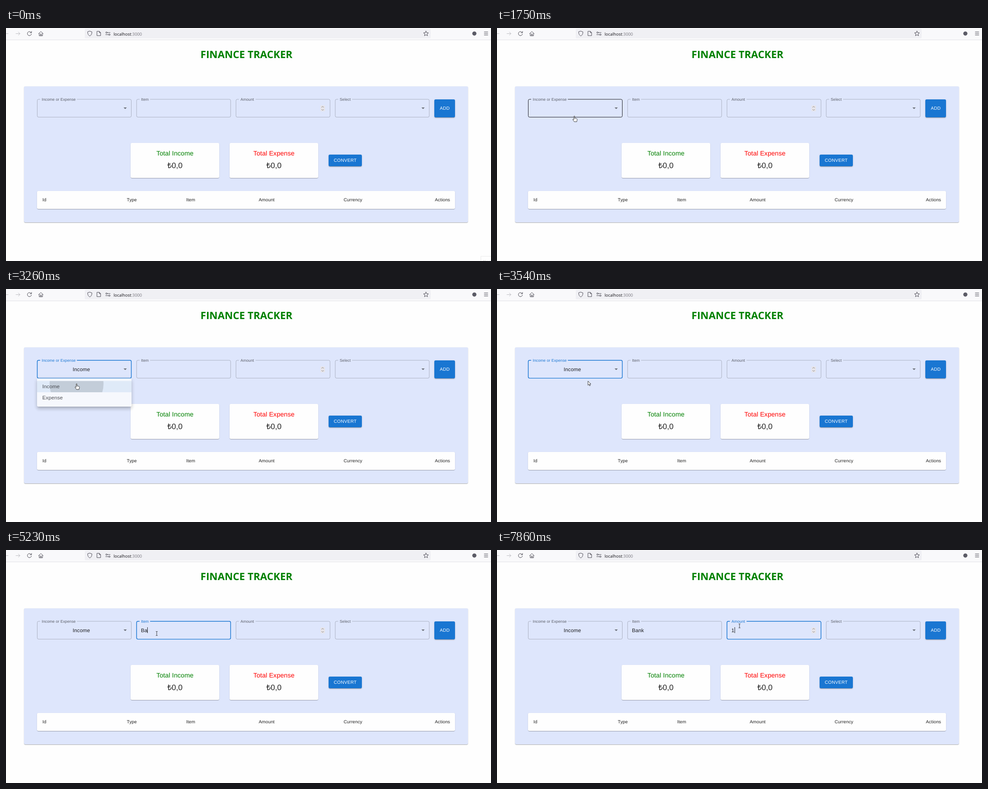
Write an HTML page that moves like this. It is 1078x519 px and loops after 8 s.

```html
<!DOCTYPE html>
<html lang="en">
<head>
<meta charset="utf-8">
<title>Finance Tracker</title>
<style>
  html, body { margin: 0; width: 100%; height: 100%; overflow: hidden; background: #fefefe; }
  body { position: relative; font-family: "Liberation Sans", Arial, sans-serif; }
  svg, .box, #menu { position: absolute; }
  svg { left: 0; top: 0; width: 1078px; height: 519px; }
  text { text-rendering: geometricPrecision; }
  .box { border-radius: 3px; background: #fefefe;
    box-shadow: 0 1.4px .7px -.7px #0003, 0 .7px .7px #00000024, 0 .7px 2.2px #0000001f; }
  .panel { background: #dee6fc; }
  .button { background: #1976d2;
    box-shadow: 0 2.2px .7px -1.4px #0003, 0 1.4px 1.4px #00000024, 0 .7px 3.6px #0000001f; }
  #menu { left: 69.3px; top: 198.9px; width: 209.4px; height: 51.7px; padding: 5.7px 0;
    border-radius: 3px; background: #fefefe; transform-origin: 50% 0;
    box-shadow: 0 3.6px 3.6px -2.2px #0003, 0 5.7px 7.2px .7px #00000024, 0 2.2px 10px 1.4px #0000001f; }
  .row { position: relative; overflow: hidden; height: 25.85px; padding-left: 11.5px;
    font-size: 11.5px; line-height: 25.85px; letter-spacing: .00938em; color: #000000de; }
  #ripple { position: absolute; left: 87.5px; top: 7px; border-radius: 50%;
    transform: translate(-50%, -50%); background: #00000029; }
  .input { font-size: 11.5px; letter-spacing: .00938em; }
  .label { font-size: 8.6px; letter-spacing: .00938em; }
  .cell { font-size: 10.05px; letter-spacing: .01071em; }
  .action { font-size: 10.05px; letter-spacing: .02857em; fill: #fff; text-anchor: middle; }
  .total { font-size: 14.36px; letter-spacing: .0075em; text-anchor: middle; }
  .sum { font-size: 17.23px; text-anchor: middle; }
  .url { font-family: "Open Sans", "Noto Sans", sans-serif; font-size: 9.4px; }
  .title { font-family: "Open Sans", "Noto Sans", sans-serif; font-size: 22.5px; font-weight: 700; }
  .icons { fill: none; stroke: #4b4a54; stroke-width: 1; stroke-linecap: round; stroke-linejoin: round; }
</style>
</head>
<body>
<div id="boxes"></div>
<svg id="page" viewBox="0 0 1078 519" fill="#000000de">
  <rect width="1078" height="26" fill="#f9f9fb"/>
  <rect y="26" width="1078" height="1" fill="#e1e1e6"/>
  <rect x="175" y="1.5" width="769" height="21.5" rx="3" fill="#f0f0f4"/>
  <g class="icons">
    <path d="M0 12.5H5M22 12.5H31M27.5 9L31 12.5L27.5 16" stroke="#bdbdc2"/>
    <path d="M56 10A4.6 4.6 0 1 0 56.6 13.5M56.8 7.5V10.7H53.6"/>
    <path d="M72.5 12.5L77.5 7.8L82.5 12.5M73.8 11.5V17.3H81.2V11.5M76.3 17V13.5H78.7V17"/>
    <path d="M186.3 7L191 8.7C191 13.5 189.5 16 186.3 17.7C183 16 181.5 13.5 181.5 8.7Z"/>
    <path d="M202.5 7.3H207.5L210.3 10.2V17H202.5ZM207.3 7.5V10.4H210"/>
    <path d="M225.5 10.2H231.5M221.5 14.8H227.5"/>
    <circle cx="223.3" cy="10.2" r="1.6"/><circle cx="229.7" cy="14.8" r="1.6"/>
    <path id="star"/>
    <path d="M1063 8.8H1071M1063 12.2H1071M1063 15.6H1071"/>
  </g>
  <circle cx="1041" cy="12.3" r="4.6" fill="#5b5b66"/>
  <text class="url" x="239" y="16.5" fill="#15141a">localhost<tspan fill="#77767e">:3000</tspan></text>
  <text class="title" x="534.5" y="67" text-anchor="middle" fill="#008000">FINANCE TRACKER</text>
  <g id="fields"></g>
  <path d="M731 0" />
  <path id="arrow" fill="#0000008a" d="M261.3 177H268.5L264.9 180.6Z"/>
  <path fill="#0000008a" d="M923.4 177H930.6L927 180.6Z"/>
  <rect x="699" y="172.5" width="10" height="13" rx="1" fill="#e7e5ea"/>
  <path d="M701.3 177L703.8 174.5L706.3 177M701.3 181L703.8 183.5L706.3 181" fill="none" stroke="#85817f"/>
  <text class="input" id="type" x="167.5" y="182.6" text-anchor="middle"></text>
  <text class="input" id="item" x="300" y="182.6"></text>
  <text class="input" id="amount" x="521" y="182.6"></text>
  <rect id="caret" y="172" width="1" height="13"/>
  <text class="action" x="975.3" y="182.2">ADD</text>
  <text class="action" x="754" y="298.4">CONVERT</text>
  <text class="total" x="375.5" y="283.6" fill="#008000">Total Income</text>
  <text class="total" x="595.5" y="283.6" fill="#f00">Total Expense</text>
  <text class="sum" x="375.4" y="311.8">₺0,0</text>
  <text class="sum" x="595.4" y="311.8">₺0,0</text>
  <g id="cells"></g>
  <g id="hint"><rect x="1055.5" y="508.5" width="30" height="20" fill="#fefefe" stroke="#ebebeb"/>
    <text id="hintText" x="1060" y="523.5" font-size="10" fill="#c8c8c8">Kapat</text></g>
</svg>
<div id="menu">
  <div class="row" id="choice">Income<div id="ripple"></div></div>
  <div class="row">Expense</div>
</div>
<svg viewBox="0 0 1078 519">
  <g id="cursor">
    <circle id="press" r="8" fill="#f3e93f" fill-opacity=".7"/>
    <path id="pointer" fill="#fff" stroke="#111" stroke-width=".8" stroke-linejoin="round"/>
  </g>
</svg>
<script>
const LOOP = 8000;
const OPEN = 2100, PICK = 3050, CLOSE = 3190, GROW = 232;
const ITEM_FOCUS = 4160, AMOUNT_FOCUS = 7250;
const GRAY = [89, 92, 101], BLUE = [25, 118, 210];
const $ = id => document.getElementById(id);
const clamp = v => Math.max(0, Math.min(1, v));
const smooth = v => v * v * (3 - 2 * v);
const mix = (a, b, p) => a + (b - a) * p;
const show = (el, on) => { el.style.display = on ? '' : 'none'; };

// Class, left, top, width, height
const boxes = [
  ['panel', 40.3, 130, 987, 302.5],
  ['button', 952.3, 158.7, 46, 40],
  ['card', 277, 256, 197.3, 78],
  ['card', 497, 256, 197, 78],
  ['button', 717, 282, 74, 26.3],
  ['table', 69.3, 362.5, 929, 40.7]
];
$('boxes').innerHTML = boxes.map(([kind, x, y, w, h]) =>
  `<div class="box ${kind}" style="left:${x}px;top:${y}px;width:${w}px;height:${h}px"></div>`).join('');

const headings = [['Id', 81, 'start'], ['Type', 290.7, 'end'], ['Item', 420.5, 'end'],
  ['Amount', 597, 'end'], ['Currency', 792, 'end'], ['Actions', 987, 'end']];
$('cells').innerHTML = headings.map(([name, x, anchor]) =>
  `<text class="cell" x="${x}" y="386.2" text-anchor="${anchor}">${name}</text>`).join('');

// Label, left edge, width of the gap in the outline
const fields = [['Income or Expense', 69.5, 81.5], ['Item', 290.3, 23.5],
  ['Amount', 511.2, 37], ['Select', 731.8, 31]];
const outline = (x, gap) => `M${x + 6.5} 158.8H${x + 3}a3 3 0 0 0 -3 3V195.6a3 3 0 0 0 3 3H${x + 206}
  a3 3 0 0 0 3 -3V161.8a3 3 0 0 0 -3 -3H${x + 6.5 + gap}`;
$('fields').innerHTML = fields.map(([name, x, gap]) =>
  `<path fill="none" d="${outline(x, gap)}"/><text class="label" x="${x + 10}" y="161.6">${name}</text>`).join('');
const frames = [...$('fields').querySelectorAll('path')];
const labels = [...$('fields').querySelectorAll('text')];

$('star').setAttribute('d', 'M' + Array.from({ length: 10 }, (_, i) => {
  const r = i % 2 ? 2.6 : 5.8, a = i * Math.PI / 5;
  return `${933.5 + r * Math.sin(a)} ${12.6 - r * Math.cos(a)}`;
}).join('L') + 'Z');

const pointers = {
  arrow: 'M0 0V9.3L2.2 7.3L3.7 10.7L5.2 10L3.7 6.8H6.6Z',
  hand: 'M0 1C0 -.3 1.8 -.3 1.8 1V5L3.4 5.2L5.2 5.6L6.6 6.2C7.4 6.6 7.3 8 7 9.4L6.2 12.8H.8L-2 9C-3.4 7.4 -2 6.4 -.9 7.3L0 8.2Z',
  beam: 'M-2 -4.5H-.6L0 -4L.6 -4.5H2M0 -4V4M-2 4.5H-.6L0 4L.6 4.5H2'
};

// Moves: first step time, last step time, steps, from x, y, to x, y
const moves = [
  [460, 740, 5, 1066, 507, 774, 372],
  [920, 1340, 7, 755, 369, 338, 297],
  [1610, 1750, 3, 318, 283, 171, 196],
  [1820, 2030, 4, 138, 186, 88, 177],
  [2440, 2570, 3, 110, 182, 160, 197],
  [2650, 2710, 2, 167, 216, 165, 230],
  [2780, 2850, 2, 160, 222, 156, 211],
  [3470, 3820, 6, 170, 209, 331, 189],
  [3890, 3960, 2, 333, 188, 335, 186],
  [6570, 6990, 7, 446, 170, 539, 169]
];
const presses = [OPEN, PICK, ITEM_FOCUS, AMOUNT_FOCUS];
const typed = [[5100, 'B'], [5230, 'Ba'], [5360, 'Ban'], [6020, 'Bank']];
const caretFlips = [4160, 4700, 5100, 5760, 6020, 6300, 6830, 7790, 7860];

function cursorAt(t) {
  const move = moves.findLast(m => t >= m[0]);
  if (!move) return null;
  const [start, end, steps, x0, y0, x1, y1] = move;
  const step = Math.floor((t - start) / (end - start) * (steps - 1) + .01);
  const p = clamp(step / (steps - 1));
  return [mix(x0, x1, p), mix(y0, y1, p)];
}

function drawCursor(t, at, hovered, menuOpen) {
  show($('cursor'), at);
  if (!at) return;
  let kind = 'arrow';
  if (menuOpen ? at[1] > 204 : hovered === 0) kind = 'hand';
  else if (!menuOpen && (hovered === 1 || hovered === 2)) kind = 'beam';
  $('cursor').setAttribute('transform', `translate(${at})`);
  $('pointer').setAttribute('d', pointers[kind]);
  $('pointer').setAttribute('fill', kind === 'beam' ? 'none' : '#fff');
  show($('press'), presses.some(p => t >= p && t < p + 130));
}

function drawFields(t, hovered) {
  const focusTimes = [[OPEN, ITEM_FOCUS], [ITEM_FOCUS, AMOUNT_FOCUS], [AMOUNT_FOCUS, LOOP], [LOOP, LOOP]];
  focusTimes.forEach(([start, end], i) => {
    const focused = t >= start && t < end;
    const tint = clamp((t - start) / 200) - clamp((t - end) / 200);
    frames[i].setAttribute('stroke', focused ? '#1976d2' : hovered === i ? '#000000de' : '#0000003b');
    frames[i].setAttribute('stroke-width', focused ? 1.45 : 1);
    labels[i].setAttribute('fill', `rgb(${GRAY.map((c, k) => mix(c, BLUE[k], tint))})`);
  });
}

function drawMenu(t) {
  const shown = smooth(clamp((t - OPEN) / GROW)) - smooth(clamp((t - CLOSE) / GROW));
  const size = t < CLOSE ? shown : 1 - smooth(clamp((t - CLOSE - GROW / 3) / (GROW * 2 / 3)));
  const menu = $('menu');
  show(menu, shown > 0);
  menu.style.opacity = shown;
  menu.style.transform = `scale(${mix(.75, 1, size)}, ${mix(.5625, 1, size)})`;
  $('choice').style.background = t < CLOSE ? '#e0e0e0' : '#e0ecf8';
  $('ripple').style.width = $('ripple').style.height = `${Math.max(0, (t - PICK) * .571)}px`;
  $('arrow').setAttribute('transform', t >= OPEN && t < CLOSE ? 'rotate(180 264.9 178.8)' : '');
  return shown > 0;
}

function drawValues(t) {
  $('type').textContent = t >= CLOSE ? 'Income' : '';
  $('item').textContent = (typed.findLast(k => t >= k[0]) || [0, ''])[1];
  $('amount').textContent = t >= 7860 ? '1' : '';
  const active = t < AMOUNT_FOCUS ? $('item') : $('amount');
  const width = active.textContent ? active.getComputedTextLength() : 0;
  $('caret').setAttribute('x', Math.round(+active.getAttribute('x') + width));
  show($('caret'), caretFlips.filter(f => t >= f).length % 2);
}

function draw(t) {
  const at = cursorAt(t);
  const hovered = at && at[1] > 158 && at[1] < 199
    ? fields.findIndex(f => at[0] > f[1] && at[0] < f[1] + 209) : -1;
  const menuOpen = drawMenu(t);
  drawFields(t, menuOpen ? -1 : hovered);
  drawValues(t);
  drawCursor(t, at, hovered, menuOpen);
  show($('hint'), t < 460);
  show($('hintText'), t < 70);
}

const began = performance.now();
function tick() {
  draw((performance.now() - began) % LOOP);
  requestAnimationFrame(tick);
}
tick();
</script>
</body>
</html>
```
